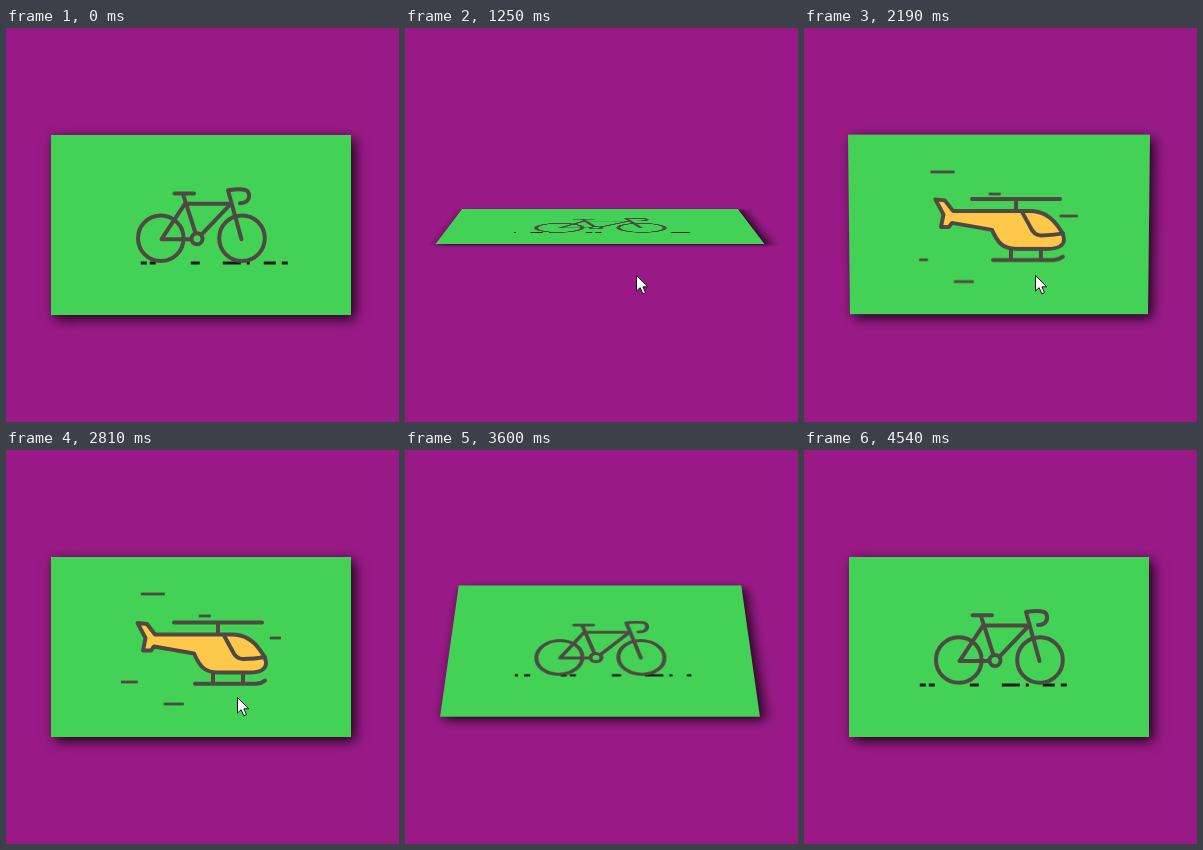
An HTML page that plays this animation: 393 px wide and 394 px high, repeating every 4620 ms.

```html
<!DOCTYPE html>
<html lang="en">
<head>
<meta charset="utf-8">
<title>Flip card</title>
<style>
  html, body { margin: 0; width: 100%; height: 100%; overflow: hidden; background: #991a87; }
  .face {
    position: absolute; left: 45px; top: 107px; width: 300px; height: 180px;
    background: #43d255; box-shadow: 4px 4px 12px rgba(0, 0, 0, .85);
  }
  svg { position: absolute; left: 0; top: 0; display: block; }
  .ink { fill: none; stroke: #4e4a43; stroke-width: 4; stroke-linecap: round; stroke-linejoin: round; }
  .body { fill: #ffc84b; }
  #road { stroke: #121a12; stroke-width: 3.2; stroke-dasharray: 6 3 6 35 9 23 18 6 3 14 12 6 6 29.5; }
  #wind { stroke: #4e4a43; stroke-width: 2.8; }
</style>
</head>
<body>
<div class="face" id="front">
  <svg width="300" height="180" viewBox="45 107 300 180">
    <path id="road" d="M112 235H284"/>
    <g id="bike" class="ink">
      <circle cx="154.8" cy="210" r="22.8"/>
      <circle cx="236" cy="210" r="22.8"/>
      <circle cx="191" cy="210.5" r="5.5"/>
      <path d="M185 211H155.5L179 175.5H225L195.5 206.5M177 166L189.5 205M168.5 165.3H188"/>
      <path d="M235.5 211L222 162Q239 159.5 242 163.5C244.5 168 243 175 234 175"/>
    </g>
  </svg>
</div>
<div class="face" id="back">
  <svg width="300" height="180" viewBox="45 107 300 180">
    <g id="wind"></g>
    <g id="heli" class="ink">
      <path d="M212 172V183M207 222V232M237 222V232M168 171.5H256M189 232.8H250Q255 232.5 259 229.5"/>
      <path class="body" d="M131.5 172L141 173L149 183.5H226C239 183.5 247 189 254 199Q260 207 260 212C260 218 254 221.500 244 221.500H212C198 221.500 193 214 188 202.500L148 195.500L145 199.500H137L139.500 187Z"/>
      <path d="M218 184.5L226.500 200Q230 208 237 208Q249 208 259 206"/>
    </g>
  </svg>
</div>
<svg width="393" height="394" viewBox="0 0 393 394">
  <path id="cursor" d="M.5 .5V16L4.2 12.7L6.8 18.8L9.5 17.7L6.9 11.8H11.8Z" fill="#fff" stroke="#111"/>
</svg>
<script>
const LOOP = 4620;
const ROAD = 176.5, WIND = 180;
const $ = id => document.getElementById(id);
const cosTurns = n => Math.cos(2 * Math.PI * n);

// Linear track through [time, value] keys, continued past both ends.
function track(keys, t) {
  let i = 1;
  while (i < keys.length - 1 && t > keys[i][0]) i++;
  const [t0, v0] = keys[i - 1], [t1, v1] = keys[i];
  return v0 + (v1 - v0) * (t - t0) / (t1 - t0);
}

function bezier(x1, y1, x2, y2) {
  const at = (a, b, s) => 3 * (1 - s) * (1 - s) * s * a + 3 * (1 - s) * s * s * b + s * s * s;
  return x => {
    if (x <= 0) return 0;
    if (x >= 1) return 1;
    let lo = 0, hi = 1;
    for (let i = 0; i < 24; i++) {
      const s = (lo + hi) / 2;
      if (at(x1, x2, s) < x) lo = s; else hi = s;
    }
    return at(y1, y2, lo);
  };
}

const flipOver = bezier(.19, .4, .27, 1);
const flipBack = bezier(.25, .1, .25, 1);
const angle = t => 180 * (flipOver((t - 960) / 1600) - flipBack((t - 3050) / 1200));

const roadX = t => track([[0, 135], [950, -100.5], [3930, -803.5], [4540, -943]], t);
const windX = t => track([[1570, 111.5], [2190, -53], [3290, -358]], t);

// One dashed line per wind lane: [shift, length] of its streak.
const lanes = [[0, 24], [58, 12], [129, 18], [86, 10], [159, 18], [23, 20]].map(([shift, len], i) => {
  const line = document.createElementNS('http://www.w3.org/2000/svg', 'path');
  line.setAttribute('d', `M115 ${144 + 22 * i}H275`);
  line.setAttribute('stroke-dasharray', `${len} ${WIND - len}`);
  $('wind').append(line);
  return { line, shift };
});

function lift(id, y) {
  $(id).setAttribute('transform', `translate(0 ${y})`);
}

function drawBike(t) {
  const x = roadX(t);
  $('road').setAttribute('stroke-dashoffset', 112 - x);
  lift('bike', .5 + .5 * cosTurns(2 * (x - 77) / ROAD));
}

function drawHeli(t) {
  const x = windX(t);
  for (const { line, shift } of lanes) line.setAttribute('stroke-dashoffset', 115 - x - shift);
  lift('heli', 4 * cosTurns(2 * (x - 143) / WIND) - 2.3);
}

// The pointer glides in from below, rests on the card, and glides out again.
function drawCursor(t) {
  const before = Math.max(0, (1250 - t) / 300);
  const after = Math.max(0, (t - 2960) / 330);
  const x = Math.round(231 + 11 * before + 23 * after);
  const y = Math.round(247 + 60 * before + 118 * after);
  $('cursor').setAttribute('transform', `translate(${x} ${y})`);
  $('cursor').setAttribute('visibility', t > 700 ? 'visible' : 'hidden');
}

function showFace(id, on, deg) {
  const style = $(id).style;
  style.visibility = on ? 'visible' : 'hidden';
  style.transform = Math.abs(deg) < .05 ? 'none' : `perspective(1000px) rotateX(${deg}deg)`;
}

function render(t) {
  const a = angle(t);
  showFace('front', a < 90, a);
  showFace('back', a >= 90, a - 180);
  drawBike(t);
  drawHeli(t);
  drawCursor(t);
}

const began = performance.now();
function tick() {
  render(Math.max(0, performance.now() - began) % LOOP);
  requestAnimationFrame(tick);
}
tick();
</script>
</body>
</html>
```
